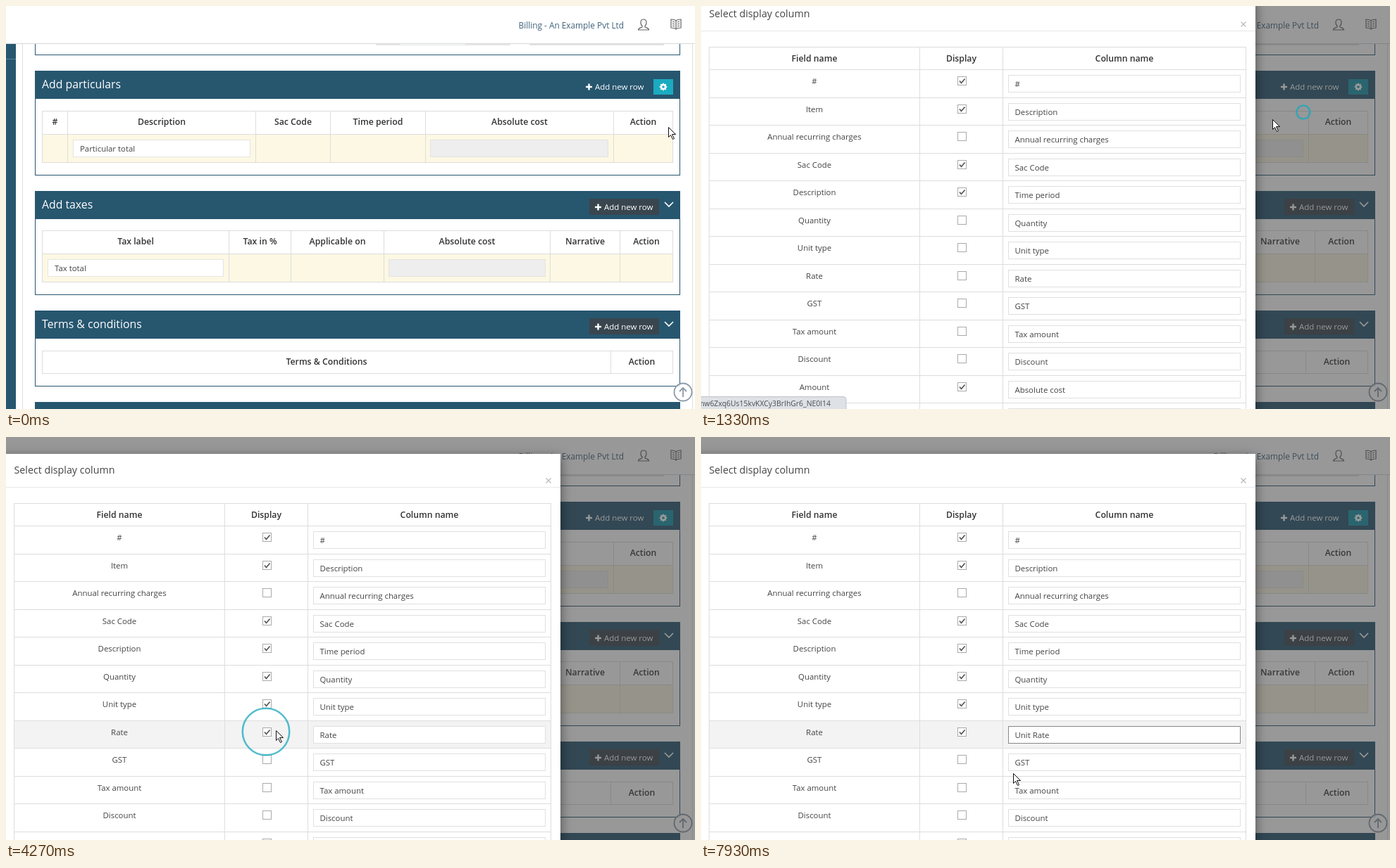
An HTML page with a canvas for the animation above (8 s loop, 978 by 573 pixels).

```html
<!DOCTYPE html>
<html lang="en">
<head>
<meta charset="utf-8">
<title>Select display column</title>
<style>
html, body { margin: 0; width: 100%; height: 100%; overflow: hidden; background: #fff; }
canvas { display: block; }
</style>
</head>
<body>
<canvas id="stage" width="978" height="573"></canvas>
<script>
const W = 978, H = 573, LOOP = 8000, TICK = 1000 / 15;
const NAVY = '#27566f', TEAL = '#1aabc0', LINE = '#ddd';
const stage = document.getElementById('stage').getContext('2d');
const sheet = document.createElement('canvas');
sheet.width = W;
sheet.height = 760;
const modal = sheet.getContext('2d');
let g = stage;

const ROW_TOP = 126.4, ROW_H = 39.53;
// field name, column name, ticked from this tick on
const ROWS = [
  ['#', '#', 0], ['Item', 'Description', 0], ['Annual recurring charges'], ['Sac Code', 'Sac Code', 0],
  ['Description', 'Time period', 0], ['Quantity', 'Quantity', 41], ['Unit type', 'Unit type', 52],
  ['Rate', 'Rate', 64], ['GST'], ['Tax amount'], ['Discount'], ['Amount', 'Absolute cost', 0], ['Narrative']
];
// pointer path: tick, x, y
const PATH = [
  [0, 940, 172], [1, 931, 134], [2, 929, 114], [14, 929, 114], [15, 929, 119], [17, 929, 119], [18, 925, 122],
  [19, 855, 151], [20, 811, 161], [26, 523, 225], [30, 372, 346], [33, 372, 346], [35, 366, 345],
  [40, 366, 345], [41, 371, 376], [42, 371, 377], [50, 371, 380], [55, 371, 380], [60, 371, 415],
  [63, 369, 419], [64, 383, 417], [68, 489, 424], [118, 489, 424], [119, 443, 478]
];
const CLICKS = [14, 40, 51, 63, 76];
const TYPED = [[90, 'U'], [94, 'Un'], [97, 'Uni'], [99, 'Unit'], [104, 'Unit R'], [105, 'Unit Ra'], [107, 'Unit Rat'], [109, 'Unit Rate']];

const clamp = v => Math.max(0, Math.min(1, v));

function pointer(k) {
  const i = Math.max(1, PATH.findIndex(p => p[0] >= k));
  const [a, b] = [PATH[i - 1], PATH[i]];
  const f = clamp((k - a[0]) / (b[0] - a[0]));
  return [a[1] + (b[1] - a[1]) * f, a[2] + (b[2] - a[2]) * f];
}

// cubic-bezier(0, 0, .58, 1)
function easeOut(x) {
  let lo = 0, hi = 1;
  for (let i = 0; i < 20; i++) {
    const s = (lo + hi) / 2;
    if (1.74 * s * s * (1 - s) + s ** 3 < x) lo = s; else hi = s;
  }
  return 3 * lo * lo - 2 * lo ** 3;
}

function rect(x, y, w, h, fill) {
  g.fillStyle = fill;
  g.fillRect(x, y, w, h);
}

function box(x, y, x2, y2, fill, line) {
  rect(x, y, x2 - x, y2 - y, line);
  rect(x + 1, y + 1, x2 - x - 2, y2 - y - 2, fill);
}

// y is the middle of the capitals
function text(s, x, y, size, color, align = 'left', weight = 400) {
  g.font = `${weight} ${size}px "Open Sans", sans-serif`;
  g.textAlign = align;
  g.fillStyle = color;
  g.fillText(s, x, y + size * .36);
}

function stroke(d, color, width = 1) {
  g.strokeStyle = color;
  g.lineWidth = width;
  g.stroke(new Path2D(d));
}

function circle(x, y, r, color, width) {
  g.beginPath();
  g.arc(x, y, r, 0, 7);
  g.strokeStyle = color;
  g.lineWidth = width;
  g.stroke();
}

function grid(xs, ys) {
  const [x0, x1, y0, y1] = [xs[0], xs.at(-1), ys[0], ys.at(-1)];
  for (const x of xs) rect(x, y0, 1, y1 - y0 + 1, LINE);
  for (const y of ys) rect(x0, y, x1 - x0 + 1, 1, LINE);
}

function heads(xs, names, y) {
  names.forEach((s, i) => text(s, (xs[i] + xs[i + 1]) / 2 + .5, y, 12.25, '#333', 'center', 600));
}

function addRow(x, y) {
  rect(x, y - 1.2, 9, 2.4, '#fff');
  rect(x + 3.3, y - 4.5, 2.4, 9, '#fff');
  text('Add new row', x + 13, y, 11.45, '#fff');
}

function section(title, y, bottom) {
  box(41, y, 957, bottom, '#fff', NAVY);
  rect(41, y, 916, 40, NAVY);
  text(title, 51, y + 19, 15.8, '#fff');
}

function sideTools(y) {
  rect(828, y + 11, 99, 23, '#39464f');
  addRow(836, y + 23);
  stroke(`M935 ${y + 16}l6 6 6-6`, '#fff', 1.6);
}

function totals(xs, names, y, label, field, cost) {
  rect(xs[0], y + 33, xs.at(-1) - xs[0], 40, '#fcf8e3');
  grid(xs, [y, y + 33, y + 73]);
  heads(xs, names, y + 16);
  box(field[0], y + 41, field[1], y + 66, '#fff', '#e5e5e5');
  text(label, field[0] + 10, y + 54, 11.4, '#444');
  box(cost[0], y + 41, cost[1], y + 66, '#eee', '#e3e3e3');
}

function gear(k) {
  const hover = clamp((k - 4) / 4);
  rect(919, 104, 28, 22, TEAL);
  rect(919, 104, 28, 22, `rgba(0,40,60,${hover * .18})`);
  circle(933, 115, 3, '#fff', 2.4);
  for (let i = 0; i < 8; i++) {
    const a = i * Math.PI / 4, c = Math.cos(a), s = Math.sin(a);
    stroke(`M${933 + c * 3.5} ${115 + s * 3.5}L${933 + c * 5.3} ${115 + s * 5.3}`, '#fff', 2);
  }
}

function page(k) {
  rect(0, 0, W, H, '#fff');
  rect(0, 54, 14, 519, NAVY);
  rect(0, 75, 14, 1, '#5b8299');
  rect(23, 54, 1, 519, '#ddd');
  rect(974, 54, 1, 519, '#ddd');
  box(41, 30, 957, 70, '#fff', NAVY);
  rect(525, 53, 191, 3, '#e6e6e6');
  rect(559, 53, 93, 2, '#fff');
  rect(743, 53, 191, 3, '#e3e3e3');
  rect(0, 0, W, 53, '#fff');
  rect(0, 53, W, 1, '#d5d8da');
  text('Billing - An Example Pvt Ltd', 877, 28, 11.85, '#3f627a', 'right');
  stroke('M905 19c-6 0-4 8-2 9v2c-2 1-5 1-5.500 4h15c-.5-3-3.500-3-5.500-4v-2c2-1 4-9-2-9z', '#666', 1.2);
  stroke('M951 21c-2-2-5-2-7-2v12c2 0 5 0 7 2 2-2 5-2 7-2V19c-2 0-5 0-7 2v12' +
    'M946 22l3 1m-3 2l3 1m-3 2l3 1m7-7l-3 1m3 2l-3 1m3 2l-3 1', '#666', 1.2);

  section('Add particulars', 92, 241);
  addRow(823, 115);
  gear(k);
  totals([51, 87, 354, 460, 595, 862, 946], ['#', 'Description', 'Sac Code', 'Time period', 'Absolute cost', 'Action'],
    149, 'Particular total', [95, 347], [602, 855]);

  section('Add taxes', 263, 411);
  sideTools(263);
  totals([51, 316, 404, 536, 772, 871, 946], ['Tax label', 'Tax in %', 'Applicable on', 'Absolute cost', 'Narrative', 'Action'],
    319, 'Tax total', [59, 309], [543, 766]);

  section('Terms & conditions', 433, 541);
  sideTools(433);
  const xs = [51, 858, 946];
  grid(xs, [490, 522]);
  heads(xs, ['Terms & Conditions', 'Action'], 506);

  rect(41, 563, 916, 10, NAVY);
  g.beginPath();
  g.arc(961, 549, 12.500, 0, 7);
  g.fillStyle = 'rgba(255,255,255,.8)';
  g.fill();
  circle(961, 549, 12.5, '#8c9aa8', 1.8);
  stroke('M961 556v-13m-5 5l5-5 5 5', '#8c9aa8', 1.8);
}

function rateField(k, y) {
  const typed = TYPED.findLast(p => p[0] <= k);
  const s = typed ? typed[1] : 'Rate';
  const picked = k >= 77 && !typed;
  if (picked) rect(445, 416, 24, 16, '#3297fd');
  text(s, 445.5, y, 11.4, picked ? '#fff' : '#444');
  if (typed && k < 117) rect(Math.round(446 + g.measureText(s).width), 417, 1, 15, '#222');
}

function dialog(k) {
  g = modal;
  g.clearRect(0, 0, W, 760);
  g.save();
  g.shadowColor = 'rgba(0,0,0,.5)';
  g.shadowBlur = 15;
  g.shadowOffsetY = 5;
  rect(-40, 24, 827, 700, '#fff');
  g.restore();
  text('Select display column', 11.5, 47, 14.25, '#444');
  rect(0, 71, 787, 1, '#e8e8e8');
  stroke('M766.5 58.500l7 7m0-7l-7 7', '#bbb', 1.3);

  const [px, py] = pointer(k - 1);
  const hover = k > 21 && px < 773 ? Math.floor((py - ROW_TOP) / ROW_H) : -1;
  const tops = ROWS.map((_, i) => Math.round(ROW_TOP + i * ROW_H - .4));
  if (hover >= 0) rect(11, tops[hover], 763, 40, '#f3f3f3');
  const xs = [11, 310, 428, 773];
  grid(xs, [94, ...tops, 640]);
  heads(xs, ['Field name', 'Display', 'Column name'], 111);
  ROWS.forEach(([field, name = field, tick = Infinity], i) => {
    const y = tops[i], focus = i === 7 && k >= 77;
    text(field, 161, y + 17, 11.4, '#444', 'center');
    box(364, y + 10, 377, y + 23, '#fff', '#aaa');
    if (k >= tick) stroke(`M367 ${y + 16.5}l2.500 3 5-6`, '#555', 1.7);
    box(436, y + 8, 766, y + 33, '#fff', focus ? '#888' : '#e0e0e0');
    if (i === 7) rateField(k, y + 21);
    else text(name, 445.5, y + 21, 11.4, '#444');
  });
  rect(718, 677, 56, 29, TEAL);
  text('Done', 746, 692, 12.3, '#fff', 'center');
  g = stage;
}

function status(k) {
  if (k > 21) return;
  g.globalAlpha = clamp((k - 3) / 5);
  g.beginPath();
  g.roundRect(-5, 555.500, 211, 25, 4);
  g.fillStyle = '#dee1e6';
  g.fill();
  g.strokeStyle = '#c0c3c8';
  g.lineWidth = 1;
  g.stroke();
  text('nmw6Zxq6Us15kvKXCy3BrIhGr6_NE0I14', 184, 565, 10.4, '#4a4d52', 'right');
  g.globalAlpha = 1;
}

function shape(d, x, y) {
  g.save();
  g.translate(Math.round(x) + .5, Math.round(y) + .5);
  g.fillStyle = '#fff';
  g.fill(new Path2D(d));
  stroke(d, '#111');
  g.restore();
}

function cursor(k) {
  const [x, y] = pointer(k);
  const part = (y - ROW_TOP) % ROW_H;
  if (k >= 2 && k < 18) {
    shape('M-1 0q2-2 3 0v7l6 1q3 1 3 4v3l-2 6h-8l-6-8q-1-3 2-2l2 2z', x, y);
  } else if (k > 20 && x > 436 && x < 766 && part > 8 && part < 33) {
    stroke(`M${x - 3.5} ${y - 7.5}h3l1 1 1-1h3m-4 1v14m-4 1h3l1-1 1 1h3`, '#111', 1.2);
  } else {
    shape('M0 0v14l3-3 3 6 2-1-3-6h5z', x, y);
  }
}

function draw(now) {
  const k = Math.floor((now % LOOP) / TICK + .06) % 120, t = k * TICK;
  page(k);
  rect(0, 0, W, H, `rgba(62,62,62,${.53 * clamp((t - 1000) / 150)})`);
  if (t > 1150) {
    dialog(k);
    g.globalAlpha = clamp((t - 1150) / 150);
    g.drawImage(sheet, 0, Math.round(-175 * (1 - easeOut(clamp((t - 1150) / 300)))));
    g.globalAlpha = 1;
  }
  status(k);
  const [rx, ry] = pointer(k - 1);
  for (const c of CLICKS) {
    const r = 38 - 4.75 * (k - c);
    if (k >= c && r > 0) circle(rx, ry, r, 'rgba(26,168,190,.75)', 2.5);
  }
  cursor(k);
}

function loop() {
  draw(performance.now());
  requestAnimationFrame(loop);
}
loop();
</script>
</body>
</html>
```
